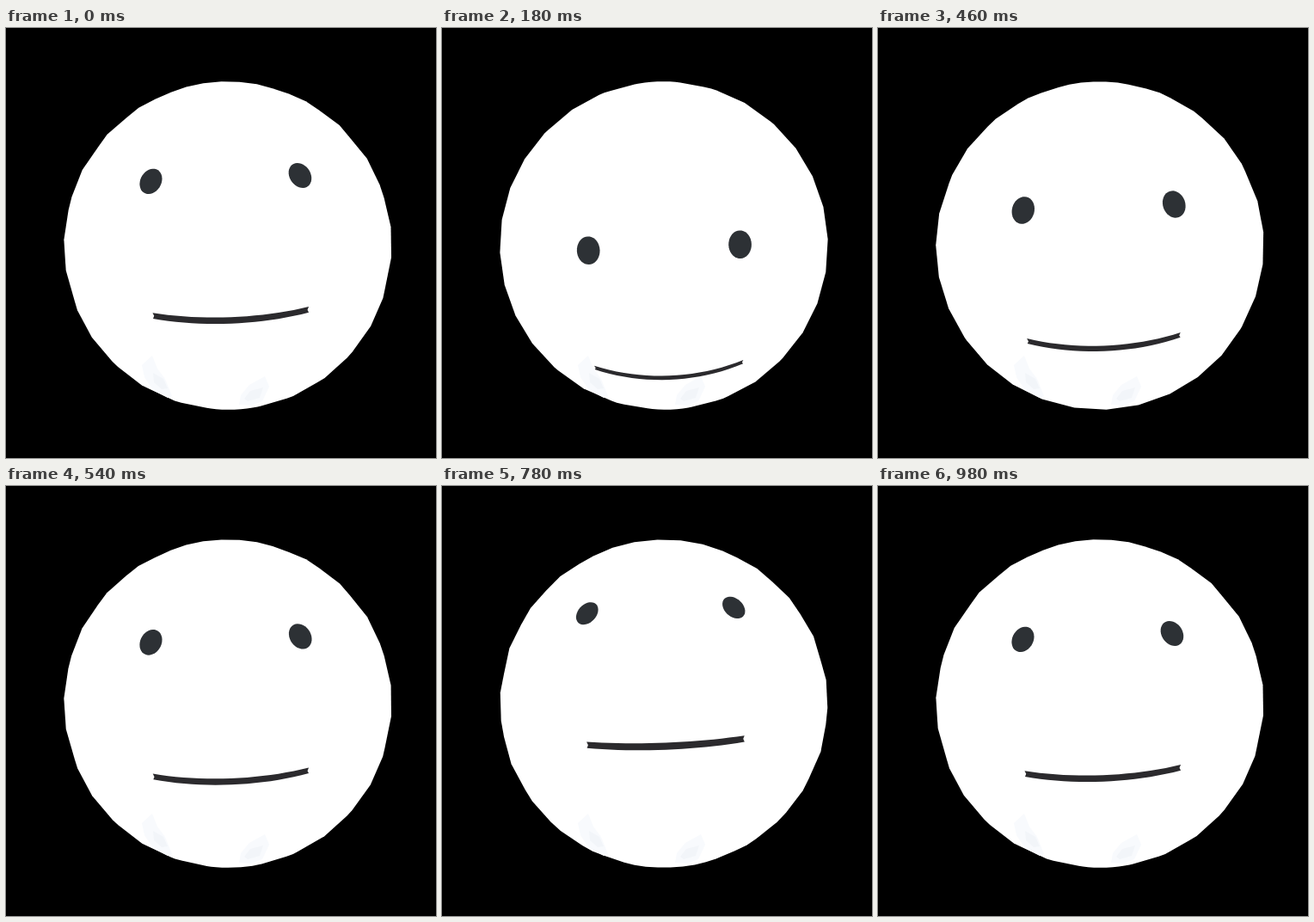
Write an HTML page that moves like this. It is 500x500 px and loops after 1000 ms.

```html
<!DOCTYPE html>
<html lang="en">
<head>
<meta charset="utf-8">
<title>Nodding ball</title>
<style>
  html, body { margin: 0; width: 100%; height: 100%; overflow: hidden; background: #000; }
  svg { display: block; width: 100%; height: 100%; }
</style>
</head>
<body>
<svg viewBox="0 0 500 500">
  <g transform="translate(258 253) rotate(-2.27)">
    <path id="ball" fill="#fff"/>
  </g>
  <g fill="#f8fafd">
    <path d="M170 381L158 392L161 406L171 421L188 430L193 428L185 408L176 396Z"/>
    <path d="M301 405L283 415L273 427L271 438L285 439L298 434L306 417Z"/>
  </g>
  <g fill="#f2f5f9">
    <path d="M171 401L172 412L181 420L188 419L183 408Z"/>
    <path d="M299 418L284 422L277 431L281 434L295 430Z"/>
  </g>
  <g transform="translate(258.3 253) rotate(-2.27)">
    <path id="eyeL" fill="#2d3135"/>
    <path id="eyeR" fill="#2d3135"/>
    <path id="mouth" fill="#2b2a2d"/>
  </g>
</svg>
<script>
const RAD = Math.PI / 180;
const LOOP = 1000, STEP = 20, SPAN = 980;
const RADIUS = 190.8, DIST = 5;
const FOCAL = 190 * Math.sqrt(DIST * DIST - 1);

// Nod keys: time in ms, pitch in degrees
const KEYS = [[0, -22.2], [180, 0.6], [300, 7.8], [460, -12.3], [620, -28], [780, -32.2]];

const el = id => document.getElementById(id);

// Key by index, wrapped around the nod's period
function key(i) {
  const n = KEYS.length, turn = Math.floor(i / n), [t, v] = KEYS[i - turn * n];
  return [t + turn * SPAN, v];
}

function slope(i) {
  const [a, va] = key(i - 1), [b, vb] = key(i), [c, vc] = key(i + 1);
  const before = (vb - va) / (b - a), after = (vc - vb) / (c - b);
  return ((c - b) * before + (b - a) * after) / (c - a);
}

// Smooth cubic curve through the keys
function pitchAt(time) {
  const t = time % SPAN;
  let i = KEYS.length - 1;
  while (KEYS[i][0] > t) i--;
  const [t0, v0] = key(i), [t1, v1] = key(i + 1), h = t1 - t0;
  const u = (t - t0) / h, w = 1 - u;
  return w * w * (1 + 2 * u) * v0 + u * u * (3 - 2 * u) * v1
    + h * u * w * (w * slope(i) - u * slope(i + 1));
}

function project([x, y, z], focal = FOCAL) {
  const s = focal / (DIST - z);
  return [x * s, y * s];
}

const toPath = pts => "M" + pts.map(p => p[0].toFixed(2) + " " + p[1].toFixed(2)).join("L") + "Z";

// Point on the unit sphere: sideways offset x, angle about the x axis
function onBall(x, deg) {
  const r = Math.sqrt(1 - x * x);
  return [x, r * Math.sin(deg * RAD), r * Math.cos(deg * RAD)];
}

// Flat oval lying tangent to the sphere
function eye(x, deg) {
  const c = onBall(x, deg), r = Math.sqrt(1 - x * x);
  const sin = Math.sin(deg * RAD), cos = Math.cos(deg * RAD);
  const pts = [];
  for (let a = 0; a < 360; a += 10) {
    const u = 0.066 * Math.cos(a * RAD), v = 0.0715 * Math.sin(a * RAD);
    pts.push(project([c[0] + u * r, c[1] - u * x * sin + v * cos, c[2] - u * x * cos - v * sin]));
  }
  return toPath(pts);
}

function mouth(deg) {
  const W = 0.405, HALF = 1.05, N = 10, pts = [];
  const add = (x, d) => pts.push(project(onBall(x, deg + d)));
  for (let i = -N; i <= N; i++) add(W * i / N, -HALF);
  add(W - 0.007, 0);
  for (let i = N; i >= -N; i--) add(W * i / N, HALF);
  add(0.007 - W, 0);
  return toPath(pts);
}

// Vertices of the faceted ball
const MESH = [];
for (let lat = -90; lat <= 90; lat += 11.25)
  for (let lon = 0; lon < 360; lon += 11.25) {
    const r = Math.cos(lat * RAD);
    MESH.push([r * Math.sin(lon * RAD), Math.sin(lat * RAD), r * Math.cos(lon * RAD)]);
  }

function halfHull(pts) {
  const out = [];
  for (const p of pts) {
    while (out.length > 1) {
      const a = out[out.length - 2], b = out[out.length - 1];
      if ((b[0] - a[0]) * (p[1] - a[1]) - (b[1] - a[1]) * (p[0] - a[0]) > 0) break;
      out.pop();
    }
    out.push(p);
  }
  return out.slice(0, -1);
}

function outline(deg) {
  const sin = Math.sin(deg * RAD), cos = Math.cos(deg * RAD);
  const focal = FOCAL * RADIUS / 190;
  const pts = MESH.map(([x, y, z]) => project([x, y * cos + z * sin, z * cos - y * sin], focal));
  pts.sort((a, b) => a[0] - b[0] || a[1] - b[1]);
  return toPath([...halfHull(pts), ...halfHull(pts.reverse())]);
}

function draw(time) {
  const pitch = pitchAt(time);
  el("ball").setAttribute("d", outline(pitch));
  el("eyeL").setAttribute("d", eye(-0.387, pitch));
  el("eyeR").setAttribute("d", eye(0.387, pitch));
  el("mouth").setAttribute("d", mouth(pitch + 44.6));
}

const start = performance.now();
function tick() {
  const t = (performance.now() - start) % LOOP;
  draw(Math.floor(t / STEP) * STEP);
  requestAnimationFrame(tick);
}
tick();
</script>
</body>
</html>
```
